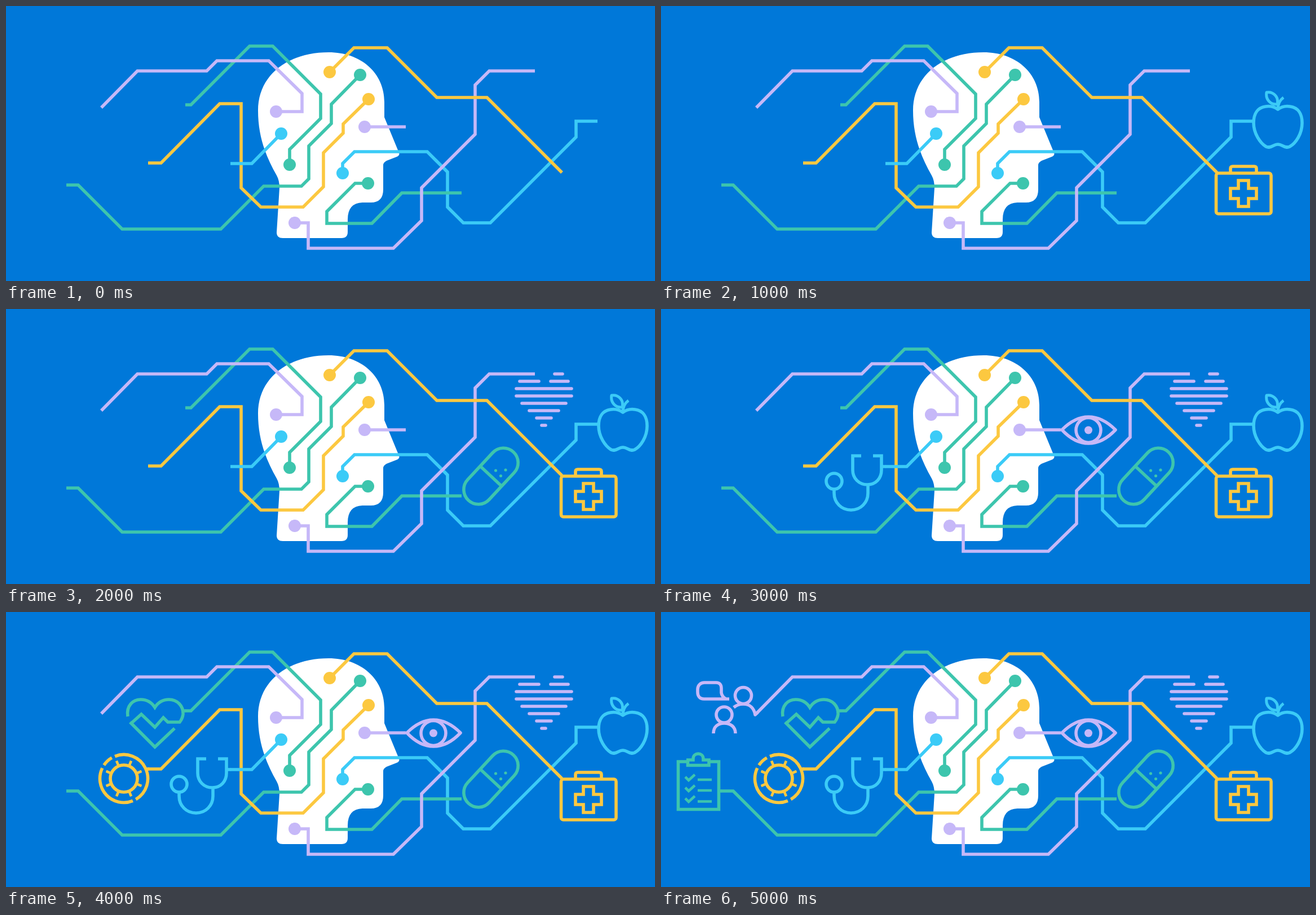
Animation of 1151x487 px, one loop 5500 ms. Source, as an HTML page:

```html
<!DOCTYPE html>
<html lang="en">
<head>
<meta charset="utf-8">
<title>Health circuits</title>
<style>
  html, body { margin: 0; width: 100%; height: 100%; overflow: hidden; background: #0078d9; }
  svg { display: block; width: 100%; height: 100%; fill: none; stroke-width: 5.6; }
  .yellow { stroke: #fcc840; color: #fcc840; }
  .green { stroke: #3dc5ad; color: #3dc5ad; }
  .cyan { stroke: #3bcbf7; color: #3bcbf7; }
  .purple { stroke: #c6b8f8; color: #c6b8f8; }
  .dot { fill: currentColor; stroke: none; }
  .icon { stroke-linejoin: round; }
  .round { stroke-linecap: round; }
</style>
</head>
<body>
<svg id="stage" viewBox="0 0 1151 487" preserveAspectRatio="none">
  <path fill="#fff" d="M480 401L485 322Q485 309 480 300C460 265 447 230 447 185C447 122 500 82 572 82C630 82 671 119 671 170V197L697 260Q699 264 693 267L675 274Q669 277 669 282V325Q669 348 647 348H632Q606 349 606 378V400Q606 411 595 411H491Q480 411 480 401Z"/>
  <g id="wires"></g>

  <g class="icon cyan">
    <path d="M1094 183C1086 177 1078 177 1072 178C1058 180 1051 191 1051 207C1051 226 1063 243 1073 249C1081 253 1086 245 1094 245C1102 245 1107 253 1115 249C1126 243 1137 226 1137 207C1137 191 1130 180 1116 178C1110 177 1102 177 1094 183Z"/>
    <path stroke-width="5" d="M1074 153C1085 151 1096 160 1093 174C1080 175 1072 165 1074 153ZM1094 183C1094 174 1097 167 1104 162"/>
  </g>

  <g class="icon yellow">
    <rect x="984.5" y="296" width="97.5" height="72" rx="4"/>
    <path d="M1010 296V288Q1010 284 1014 284H1052Q1056 284 1056 288V296"/>
    <path stroke-linejoin="miter" d="M1024 309H1042V323H1056V341H1042V355H1024V341H1010V323H1024Z"/>
  </g>

  <g class="icon purple round">
    <path d="M973 115H987M911 128H945M966 128H997M905 141H1003M905 154H1003M915 167H993M928 180H980M941 193H967M950 206H957"/>
  </g>

  <g class="icon green">
    <g transform="translate(860 296) rotate(-47)">
      <rect x="-58.5" y="-26" width="117" height="52" rx="26"/>
      <path d="M0 -26V26"/>
    </g>
    <g class="dot">
      <circle cx="868.5" cy="286" r="2.6"/><circle cx="886" cy="285" r="2.6"/><circle cx="877.5" cy="295.5" r="2.6"/>
    </g>
  </g>

  <g class="icon purple">
    <path d="M711 214C728 197 743 191 758 191C773 191 789 197 806 214C789 232 773 238 758 238C743 238 728 232 711 214Z"/>
    <circle cx="758" cy="214.5" r="22"/>
    <circle class="dot" cx="758" cy="214.5" r="7"/>
  </g>

  <g class="icon cyan">
    <circle cx="307" cy="305" r="14"/>
    <path stroke-linejoin="miter" d="M307 319V326C307 343 320 356 337 356S367 343 367 326V311M355 260H340V285C340 300 351 311 366 311S391 300 391 285V260H376M391 279H399"/>
  </g>

  <g class="icon green">
    <path stroke-linejoin="miter" d="M216 185C213 166 225 155 239 155Q255 155 264 169Q273 155 289 155C304 155 315 167 314 181Q313 189 308 195H287L279 187L264 204L240 181L221 198M220 195L264 239L299 206M314 175H319"/>
  </g>

  <g class="icon yellow" id="cell">
    <circle cx="209" cy="295" r="24"/>
  </g>

  <g class="icon purple">
    <circle cx="146" cy="148" r="14.5"/>
    <circle cx="112" cy="182" r="14"/>
    <path d="M93 215C93 203 101 197 112 197S132 203 132 215M129 169Q136 163 146 163C158 163 165 171 167 182L172 177"/>
    <path d="M121 154H76C69 154 65 149 65 142V137C65 130 70 125 77 125H98C104 125 107 129 107 135V143Q108 150 115 154"/>
  </g>

  <g class="icon green">
    <path stroke-linejoin="miter" d="M47 265H30.5V349.5H102.5V265H85M47.5 262V271.5H85V262H75V260C75 248 57 248 57 260V262H45M103 317H108"/>
    <path stroke-width="4.6" stroke-linejoin="miter" d="M43 292L49 298L60 288M43 311L49 317L60 307M43 330L49 336L60 326M65 297H90M65 316H90M65 335.5H90"/>
  </g>
</svg>
<script>
const LOOP = 5500, STEP = 500;
const wires = document.getElementById('wires');
const cell = document.getElementById('cell');

function add(parent, tag, attrs) {
  const node = document.createElementNS('http://www.w3.org/2000/svg', tag);
  for (const key in attrs) node.setAttribute(key, attrs[key]);
  return parent.appendChild(node);
}

// Each wire starts at its dot: colour, x, y, rest of the path.
[
  ['green', 628, 122, 'L577 174V208L537 248V306L524 319H457L381 395H206L128 317H107'],
  ['yellow', 643, 165, 'L598 209V225L563 260V320L527 356H452L417 322V173H379L275 278H252'],
  ['cyan', 488, 226, 'L436 279H398'],
  ['green', 503, 281, 'V254L558 199V156L473 71H432L328 175H318'],
  ['purple', 479, 187, 'H525V155L466 97H374L356 115H233L169 180'],
  ['purple', 636, 214, 'H709'],
  ['cyan', 597, 296, 'V279L618 258H747L783 294V356L811 384H859L1011 232V204H1049'],
  ['green', 642, 314, 'H619L569 364V385H649L702 331H808'],
  ['purple', 512, 384, 'H536V429H687L737 380V322L832 227V140L857 115H938'],
  ['yellow', 574, 117, 'L617 74H676L764 162H853L986 295']
].forEach(([color, x, y, rest]) => {
  const wire = add(wires, 'g', { class: color });
  add(wire, 'path', { d: `M${x} ${y}${rest}` });
  add(wire, 'circle', { class: 'dot', cx: x, cy: y, r: 11 });
});

const polar = (r, deg) => {
  const a = deg * Math.PI / 180;
  return `${209 + r * Math.cos(a)} ${295 + r * Math.sin(a)}`;
};

for (let a = 22.5; a < 360; a += 45) {
  add(cell, 'path', { d: `M${polar(24, a)}L${polar(34, a)}`, 'stroke-width': 4.6 });
}
[[-112, 60], [68, 206], [214, 240]].forEach(([from, to]) => {
  const large = to - from > 180 ? 1 : 0;
  add(cell, 'path', { d: `M${polar(42.5, from)}A42.5 42.5 0 ${large} 1 ${polar(42.5, to)}` });
});
add(cell, 'path', { d: 'M250 278H254' });

// Icons pop in one by one, from right to left.
document.querySelectorAll('.icon').forEach((icon, i) => {
  const offset = (i + 1) * STEP / LOOP;
  icon.animate([
    { opacity: 0, offset: 0 },
    { opacity: 0, offset },
    { opacity: 1, offset },
    { opacity: 1, offset: 1 }
  ], { duration: LOOP, iterations: Infinity });
});
</script>
</body>
</html>
```
